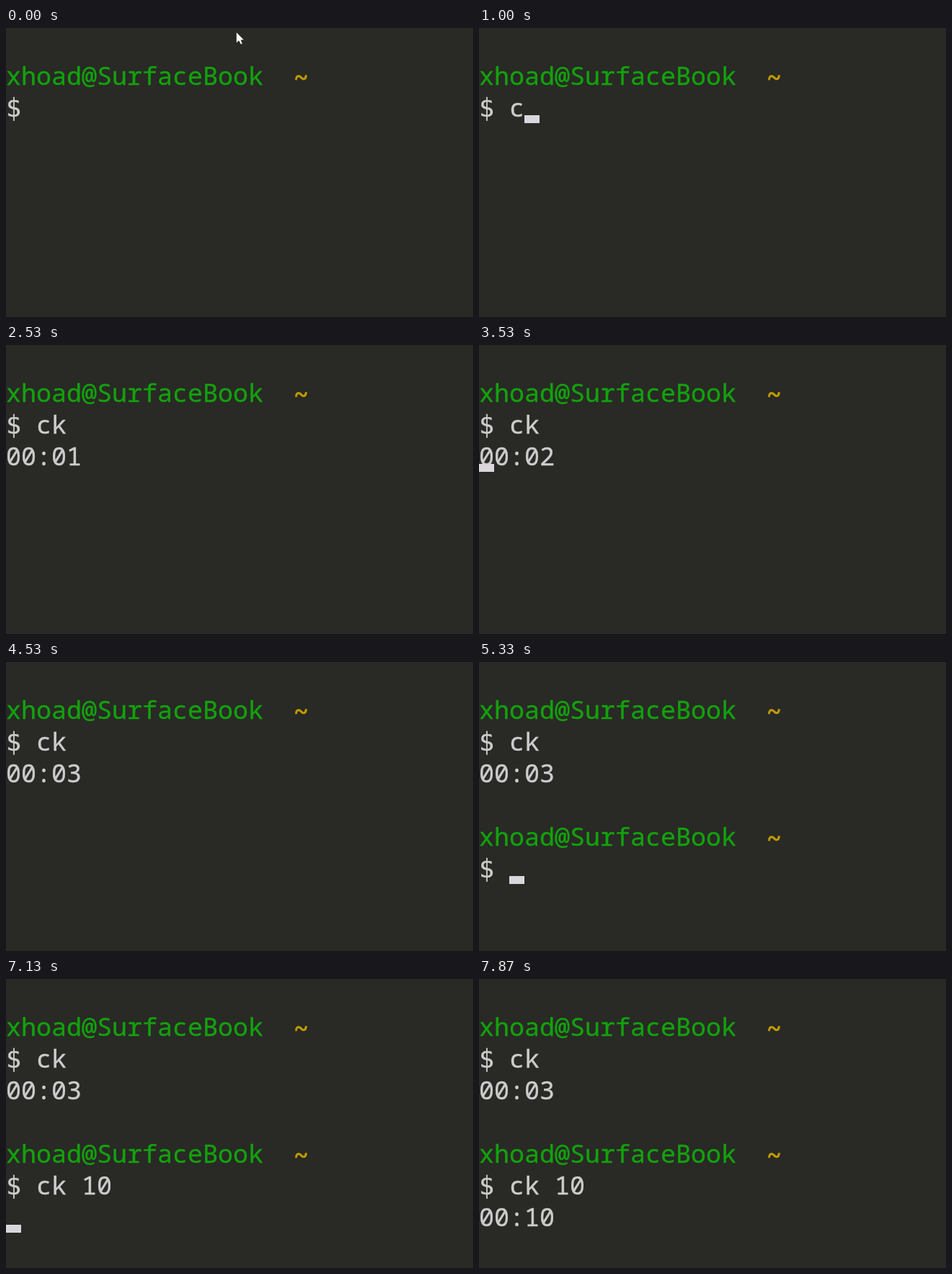
Write an HTML page that moves like this. It is 648 px wide and 401 px high and loops after 8000 ms.

```html
<!DOCTYPE html>
<html lang="en">
<head>
<meta charset="utf-8">
<title>Terminal timer</title>
<style>
  html, body { margin: 0; width: 100%; height: 100%; overflow: hidden; background: #292925; }
  svg { display: block; width: 648px; height: 401px; }
  text {
    font: 35px "Noto Sans Mono", monospace; white-space: pre; font-variant-ligatures: none;
    color: #ccc; fill: currentColor; stroke: currentColor; stroke-width: .4;
  }
  .user { color: #13a10e; }
  .path { color: #c19c00; font-weight: 700; }
  .sign { font-family: "DejaVu Sans Mono", monospace; }
  .caret { fill: #dad7dc; }
</style>
</head>
<body>
<svg id="screen" viewBox="0 0 648 401">
  <path id="pointer" d="M319.5 5.5V21L323 17.7L325.6 22.5H328.3L326.2 16.8H330.5Z"
        fill="#fff" stroke="#111" stroke-width=".6"/>
</svg>
<script>
const LOOP = 8000, CELL = 21, ROW = 44, BASELINE = 35;
const screen = document.getElementById("screen");
const pointer = document.getElementById("pointer");

function add(tag, attrs, content = "") {
  const node = document.createElementNS("http://www.w3.org/2000/svg", tag);
  for (const key in attrs) node.setAttribute(key, attrs[key]);
  node.textContent = content;
  return screen.appendChild(node);
}

function write(row, col, content = "", className = "", dy = 0) {
  return add("text", { x: col * CELL, y: row * ROW + BASELINE + dy, class: className }, content);
}

function addPrompt(row) {
  return [
    write(row, 0, "xhoad@SurfaceBook", "user"),
    write(row, 19, "~", "path", 3),
    write(row + 1, 0, "$", "sign")
  ];
}

addPrompt(1);
const secondPrompt = addPrompt(5);

// Each track holds [start time, value] steps.
const lines = [
  { node: write(2, 2), steps: [[0, ""], [930, "c"], [1070, "ck"]] },
  { node: write(3, 0), steps: [[0, ""], [1530, "00:00"], [2530, "00:01"], [3530, "00:02"], [4530, "00:03"]] },
  { node: write(6, 2), steps: [[0, ""], [5530, "c"], [5730, "ck"], [6330, "ck "], [6800, "ck 1"], [6870, "ck 10"]] },
  { node: write(7, 0), steps: [[0, ""], [7270, "00:10"]] }
];

// Caret cell as [row, column], or null while blinked off.
const caretSteps = [
  [0, null], [930, [2, 3]], [1070, null], [1130, [2, 4]],
  [1330, [3, 0]], [2070, null], [3130, [3, 0]], [4200, null],
  [5330, [6, 2]], [5530, [6, 3]], [5730, null], [6270, [6, 4]],
  [6330, [6, 5]], [6800, [6, 6]], [6870, [6, 7]], [7130, [7, 0]], [7870, null]
];
const caret = add("rect", { width: CELL, height: 11, class: "caret" });

const valueAt = (steps, time) => steps.findLast(([start]) => start <= time)[1];
const show = (node, visible) => node.setAttribute("visibility", visible ? "visible" : "hidden");

function draw(time) {
  show(pointer, time < 200);
  secondPrompt.forEach(node => show(node, time >= 5330));
  for (const { node, steps } of lines) {
    const content = valueAt(steps, time);
    if (node.textContent !== content) node.textContent = content;
  }
  const cell = valueAt(caretSteps, time);
  show(caret, cell);
  if (cell) {
    caret.setAttribute("x", cell[1] * CELL);
    caret.setAttribute("y", cell[0] * ROW + 33);
  }
}

const begin = performance.now();
function tick() {
  draw((performance.now() - begin) % LOOP);
  requestAnimationFrame(tick);
}
tick();
</script>
</body>
</html>
```
